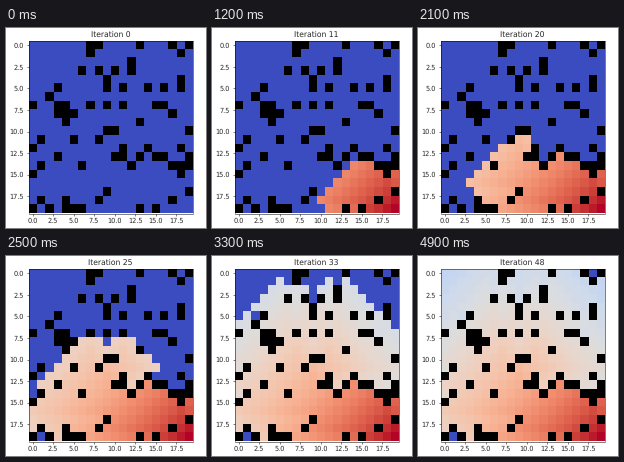
Animation, 200 px wide and 200 px high, one loop 5 s. Source, as a matplotlib script:

```python
import matplotlib.pyplot as plt
import numpy as np
from matplotlib.animation import FuncAnimation

SIZE = 20
WALL_SHARE = 0.2
GAMMA = 0.977
TICKS = 50
HELD = {3, 5, 27, 39, 41}
PX = 200
DPI = 100


def make_maze():
    """Random walls, kept clear around the start and goal corners."""
    rng = np.random.RandomState(0)
    walls = rng.rand(SIZE, SIZE) > 1 - WALL_SHARE
    walls[:2, :2] = False
    walls[-2:, -2:] = False
    return walls


def sweep(values, walls):
    """One Bellman update over the four neighbours of every cell."""
    padded = np.pad(np.where(walls, 0, values), 1)
    best = np.max([padded[:-2, 1:-1], padded[2:, 1:-1],
                   padded[1:-1, :-2], padded[1:-1, 2:]], axis=0)
    updated = GAMMA * best
    updated[-1, -1] = 1.0
    return updated


def iteration_at(tick):
    """Sweep count on screen; some ticks hold, and some stretches lag by one."""
    if tick in HELD:
        tick -= 1
    lagging = 11 <= tick < 25 or tick >= 43
    return tick - lagging


walls = make_maze()
history = [np.zeros((SIZE, SIZE))]
for _ in range(TICKS):
    history.append(sweep(history[-1], walls))


def masked(k):
    return np.ma.array(history[k], mask=walls)


plt.rcParams.update({
    "font.family": "DejaVu Sans",
    "axes.linewidth": 0.36,
    "text.hinting": "none",
})
fig = plt.figure(figsize=(PX / DPI, PX / DPI), dpi=DPI, facecolor="white")
left, right, top, bottom = 22.5, 186.5, 13, 185.5
ax = fig.add_axes([left / PX, 1 - bottom / PX,
                   (right - left) / PX, (bottom - top) / PX])

cmap = plt.get_cmap("coolwarm").copy()
cmap.set_bad("black")
grid = ax.imshow(masked(0), cmap=cmap, vmin=0, vmax=1, aspect="auto",
                 interpolation="nearest")
ticks = np.arange(0, SIZE, 2.5)
ax.set_xticks(ticks)
ax.set_yticks(ticks)
ax.xaxis.set_major_formatter("{x:.1f}")
ax.yaxis.set_major_formatter("{x:.1f}")
ax.tick_params(labelsize=4.7, length=1.6, width=0.36, pad=1.6,
               labelcolor="0.15")
title = ax.set_title("Iteration 0", fontsize=5.5, pad=2.9, color="0.15")


def update(frame):
    k = iteration_at(frame)
    grid.set_data(masked(k))
    title.set_text(f"Iteration {k}")
    return grid, title


anim = FuncAnimation(fig, update, frames=TICKS, interval=100,
                     repeat=True, repeat_delay=0, blit=False)
plt.show()
```
